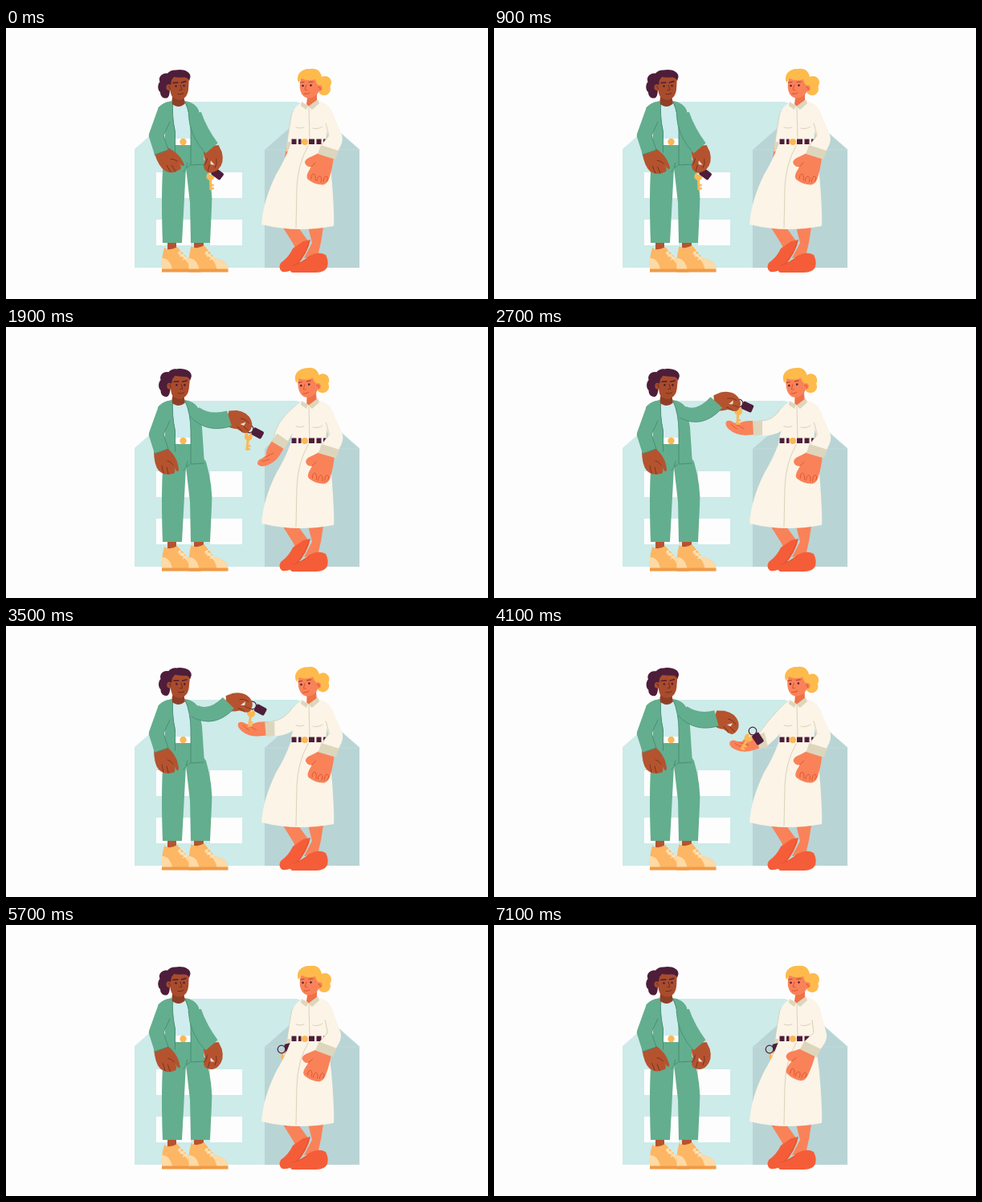
Recreate the animation shown at these times as an HTML page with a canvas. Size 600x338 px, loop 7.2 s.

```html
<!DOCTYPE html>
<html lang="en">
<head>
<meta charset="utf-8">
<title>Handing over the keys</title>
<style>
html, body { margin: 0; width: 100%; height: 100%; overflow: hidden; background: #fefdfe; }
canvas { display: block; }
</style>
</head>
<body>
<canvas id="stage" width="600" height="338"></canvas>
<script>
const ctx = document.getElementById('stage').getContext('2d');
const LOOP = 7200, STEP = 100;

const C = {
  paper: '#fefdfe', wall: '#cdebe9', gable: '#b9d4d5', seam: '#c4dbdb',
  green: '#63ae8e', greenLine: '#41876f', shirt: '#cfecee',
  brown: '#b5532f', face: '#a94c2c', neck: '#8f3f28', brownLine: '#6d2c1e', plum: '#4e1d39',
  gold: '#fbb755', shoe: '#fdb663', shoeCap: '#fddaa6', sole: '#f09a45',
  cream: '#fbf4e7', tan: '#ddd6bd', creamLine: '#d3c8ac',
  peach: '#f98259', peachLine: '#d9532f', blonde: '#feba4b', slipper: '#f55d38'
};

function fill(d, color) {
  ctx.fillStyle = color;
  ctx.fill(new Path2D(d));
}

function line(d, color, width = 0.9) {
  ctx.strokeStyle = color;
  ctx.lineWidth = width;
  ctx.stroke(new Path2D(d));
}

function dot(x, y, r, color) {
  ctx.fillStyle = color;
  ctx.beginPath();
  ctx.arc(x, y, r, 0, Math.PI * 2);
  ctx.fill();
}

function rect(x, y, w, h, color) {
  ctx.fillStyle = color;
  ctx.fillRect(x, y, w, h);
}

// Draws in a frame moved to (x, y) and turned by an angle in degrees.
function at(x, y, degrees, draw) {
  ctx.save();
  ctx.translate(x, y);
  ctx.rotate(degrees * Math.PI / 180);
  draw();
  ctx.restore();
}

function turned(x, y, degrees, draw) {
  at(x, y, degrees, () => { ctx.translate(-x, -y); draw(); });
}

// Smooth interpolation that rests on holds and never overshoots.
function track(t, keys) {
  const last = keys.length - 1;
  if (t <= keys[0][0]) return keys[0].slice(1);
  if (t >= keys[last][0]) return keys[last].slice(1);
  let i = 0;
  while (keys[i + 1][0] < t) i++;
  const slope = (k, c) => k < 0 || k >= last ? 0
    : (keys[k + 1][c] - keys[k][c]) / (keys[k + 1][0] - keys[k][0]);
  const tangent = (k, c) => {
    const a = slope(k - 1, c), b = slope(k, c);
    return a * b > 0 ? 2 * a * b / (a + b) : 0;
  };
  const span = keys[i + 1][0] - keys[i][0];
  const s = (t - keys[i][0]) / span, s2 = s * s, s3 = s2 * s;
  return keys[i].slice(1).map((v, n) => {
    const c = n + 1;
    return v * (2 * s3 - 3 * s2 + 1) + keys[i + 1][c] * (3 * s2 - 2 * s3)
      + span * (tangent(i, c) * (s3 - 2 * s2 + s) + tangent(i + 1, c) * (s3 - s2));
  });
}

// elbow x, elbow y, wrist x, wrist y, hand angle
const GIVING_ARM = [
  [1150, 239, 130, 256, 150, 83], [1400, 241, 130, 260, 147, 58],
  [1900, 252, 122, 278, 114, 16], [2500, 256, 117, 277, 94, -4],
  [3300, 256, 117, 277, 94, -4], [4100, 252, 122, 277, 115, 20],
  [4750, 239, 130, 256, 150, 83]
];
const TAKING_ARM = [
  [1450, 364, 128, 358, 148, 98], [1900, 344, 127, 342, 142, 124],
  [2500, 353, 129, 329, 126, 180], [3300, 353, 129, 329, 126, 180],
  [4100, 350, 126, 334, 143, 166], [4800, 364, 128, 358, 148, 98]
];
// ring x, ring y, fob angle, key angle
const KEYS = [
  [1150, 254, 175, 37, 88], [1400, 264, 172, 28, 88],
  [1900, 303, 127, 28, 97], [2500, 305, 95, 24, 95],
  [3300, 305, 95, 24, 95], [4100, 322, 131, 56, 122],
  [4500, 335, 148, 30, 105], [4800, 343, 155, -15, 65]
];
const IDLE_HAND = [[500, -18], [1350, 0], [5300, 0], [6100, -8]];
const FRONT_ARM = [[500, 0], [1900, -1], [5200, 0], [6400, 8]];
const GIVER_HEAD = [[1200, 0], [1900, 2.5], [3300, 2.5], [4700, 0]];
const TAKER_HEAD = [[1300, 0], [1900, -6], [3300, -6], [4500, 0]];

function sleeve(sx, sy, [ex, ey, wx, wy], widths, color, edge) {
  const normal = (ax, ay, bx, by) => {
    const len = Math.hypot(bx - ax, by - ay) || 1;
    return [-(by - ay) / len, (bx - ax) / len];
  };
  const n0 = normal(sx, sy, ex, ey), n1 = normal(sx, sy, wx, wy), n2 = normal(ex, ey, wx, wy);
  const p = (x, y, n, w) => `${x + n[0] * w} ${y + n[1] * w}`;
  const [a, b, c] = widths;
  const sideA = `${p(sx, sy, n0, a)} Q${p(ex, ey, n1, b)} ${p(wx, wy, n2, c)}`;
  const sideB = `L${p(wx, wy, n2, -c)} Q${p(ex, ey, n1, -b)} ${p(sx, sy, n0, -a)}`;
  fill(`M${sideA} ${sideB}Z`, color);
  line(`M${sideA}`, edge, 0.7);
}

function house() {
  fill('M160 299V151L227 92H362L381 99L440 151V299Z', C.wall);
  for (const y of [180, 239]) {
    rect(187, y, 43, 32, C.paper);
    rect(254, y, 40, 32, C.paper);
  }
  fill('M322 299V152L381 100L440 152V299Z', C.gable);
  line('M322 152H440', C.seam, 0.8);
}

function sneaker(x, lift) {
  at(x, 0, 0, () => {
    fill(`M3 ${275 - lift}Q10 ${280 - lift} 19 ${274 - lift}L32 287Q48 290 49 301H0Q-1 288 3 ${275 - lift}Z`, C.shoe);
    fill('M0 287Q10 287 13 301H0Z', C.shoeCap);
    fill('M21 278L32 287Q48 290 49 301H35Q33 289 21 283Z', C.shoeCap);
    rect(0, 300.5, 49, 4, C.sole);
    line('M20 281l5 -3M23 285l5 -3M26 289l5 -3', '#fff0d8', 1);
  });
}

function giverBody() {
  rect(201, 264, 11, 16, C.brown);
  rect(234, 264, 12, 14, C.brown);
  sneaker(194, 1);
  sneaker(227.5, 3);
  fill('M210 145H231L249 168Q258 200 256 224L254 268H230L229 218L224 174L219 268H195Q193 215 195 178L199 154Z', C.green);
  line('M226 168L224 174M229 171Q224 174 221 179', C.greenLine, 0.8);
  fill('M206 92Q214 100 224 92L231 102V146H206Z', C.shirt);
  rect(209, 138, 21, 8, '#ffffff');
  dot(220.5, 142, 4.2, C.gold);
  fill('M208 91C200 92 193 95 189 100L199 120L196 157L211 158V130Q206 108 208 91Z', C.green);
  fill('M222 91C231 92 237 96 240 103L244 125L247 171L230 172V130Q230 108 222 91Z', C.green);
  line('M208 92Q206 108 210.5 130V155M223 92Q230 108 230 130V171L246 170', C.greenLine, 0.8);
}

function giverHead(angle) {
  turned(214, 92, angle, () => {
    fill('M202 57C195 55 189 61 191.5 67C188 71 189 78 192 80C192 86 197 89 201 87C204 85 204 79 204 70Z', C.plum);
    fill('M208 80L206 94Q215 102 223 94L221 85Z', C.neck);
    fill('M204 60Q203 80 207 86Q213 91 219 89Q226 86 227 77L228 60Z', C.face);
    dot(203.5, 74, 4, C.face);
    fill('M199 69C197 59 202 52 211 52.5C220 50.5 230 54 229.5 61L228 66Q227 62 222 61.5Q214 62 209 61L206 65L205 71Z', C.plum);
    line('M208 68.5L214 68M218.5 68L224 66.5', C.plum, 1.4);
    dot(211.5, 72.5, 1.3, C.plum);
    dot(221.5, 72, 1.3, C.plum);
    line('M217 71L219 77L216 77.5M214 82.5Q218 83.5 221 81.5M202 73Q205 72 204 76', C.brownLine, 1);
  });
}

function giverIdleArm(angle) {
  turned(192, 153, angle, () => {
    fill('M184 153L200 150Q212 161 214 172Q216 180 214 180Q211 180 208 171Q213 183 207 183Q197 186 190 179Q184 172 184 153Z', C.brown);
    line('M208 172Q204 167 201 167M202 183L200 175M196 182L194 173', C.brownLine, 0.8);
  });
  fill('M207 91Q191 93 188 104L178 132Q177 135 179 139L185 158L202 152L196 134L204 117Z', C.green);
  line('M204 117L196 134L202 152L185 158', C.greenLine, 0.8);
}

function giverArm(pose) {
  at(pose[2], pose[3], pose[4], () => {
    fill('M-3 -9L6 -12Q20 -14 27 -5Q32 2 28 9Q25 14 20 12L13 10Q5 12 -3 9Z', C.brown);
    line('M27 8Q20 6 17 2M25 -1Q20 -5 14 -4M20 12Q17 8 12 7', C.brownLine, 0.8);
    fill('M15 3L21 -1L20 4Z', '#f2ded4');
  });
  sleeve(235, 106, pose, [8, 12, 10], C.green, C.greenLine);
}

function keyring([x, y, fob, key]) {
  at(x, y, key, () => {
    rect(10, -1.5, 17, 3, C.gold);
    rect(20, -4, 2.5, 4, C.gold);
    rect(24, -4, 2.5, 4, C.gold);
    dot(10, 0, 5, C.gold);
    dot(7, 0, 1.2, C.wall);
  });
  at(x, y, fob, () => {
    ctx.fillStyle = C.plum;
    ctx.beginPath();
    ctx.roundRect(4.5, -5, 14, 10, 2);
    ctx.fill();
  });
  ctx.beginPath();
  ctx.arc(x, y, 4.8, 0, Math.PI * 2);
  ctx.strokeStyle = C.plum;
  ctx.lineWidth = 1.2;
  ctx.stroke();
}

function takerArm(pose) {
  at(pose[2], pose[3], pose[4], () => {
    fill('M2 -8L16 -9Q28 -9 36 -2Q42 3 40 8Q36 11 31 7L25 5Q20 9 10 9L2 9Z', C.peach);
    line('M27 4Q22 2 18 -1M34 5Q31 1 27 -1', C.peachLine, 0.8);
  });
  sleeve(366, 106, pose, [10, 12, 9], C.cream, C.creamLine);
  at(pose[2], pose[3], pose[4], () => fill('M-5 -9L6 -9.5L7 9L-5 9Z', C.tan));
}

function takerBody() {
  fill('M376 248H395Q393 266 388 285L371 287L381 268Z', C.peach);
  fill('M345 249H364L377 267L364 284L358 270Z', C.peach);
  fill('M370 266L379 264Q376 280 361 298Q354 305 344 304Q338 300 342 293Q352 286 357 275Z', C.slipper);
  fill('M378 284Q389 278 398 283Q402 291 400 298Q397 305 386 305H356Q350 301 356 296Q368 293 378 284Z', C.slipper);
  line('M377 267Q373 282 362 294M378 285Q369 293 357 296', C.peachLine, 0.8);
  fill('M369 93L377 98L387 90Q396 93 402 102L400 117L398 146Q404 165 406 195Q409 237 408 247Q362 256 318 245Q320 216 336 183Q347 165 354 146L355 138L358 128L358 103Q361 96 369 93Z', C.cream);
  line('M377 100L378 138M376 147Q363 170 362 200L361 249M382 125Q388 127 394 123M361 124Q366 126 371 124', C.creamLine, 0.8);
  rect(355.5, 138.5, 43, 6.5, C.plum);
  for (const x of [361.5, 384, 392.5]) rect(x, 137.5, 2.5, 8.5, C.cream);
  rect(367.5, 138, 9.5, 8, C.cream);
  dot(372, 142, 4, C.gold);
}

function takerHead(angle) {
  turned(379, 93, angle, () => {
    dot(397, 68, 8, C.blonde);
    dot(396, 76, 8, C.blonde);
    fill('M376 80L374 95L378 99L387 93V78Z', '#ef7148');
    fill('M367 62Q364 75 368 82Q372 89 380 87Q389 85 391 74L390 61Z', C.peach);
    fill('M364 68C360 57 369 50 379 51C388 49.5 394 56 393 65L391 74Q386 70 385 64Q376 67 368 63Z', C.blonde);
    dot(390, 75, 3.8, C.peach);
    line('M366.5 68L371 67.5M377 67.5L382 67', '#b5482c', 1.2);
    dot(369.5, 72, 1.3, C.plum);
    dot(379.5, 71.5, 1.3, C.plum);
    line('M374 71L372 77L375 77.5M371 82Q375 83 378 81M389 74Q392 73 391 77', C.peachLine, 1);
  });
  fill('M368 92L376 97L374 102L367 97ZM376 98L388 89L390 94L381 102Z', C.tan);
}

function takerFrontArm(angle) {
  turned(398, 105, angle, () => {
    fill('M391 155L408 161Q406 176 403 185Q401 194 395 195.5Q385 196 376 189Q373 186 376 180L380 173Q374 174 372 168Q372 163 381 160Z', C.peach);
    line('M380 173L385 168M380 188Q380 182 383 182Q386 183 385 190M387 191Q388 184 391 185Q394 187 392 192M395 192Q396 184 399 185Q402 187 399 191', C.peachLine, 0.9);
    fill('M388 91Q401 93 406 104L418 133Q420 139 417 146L413 154L391 148L401 135L396 118Z', C.cream);
    line('M398 119L402 134L393 146', C.creamLine, 0.8);
    fill('M392 146L414 153L410 164L388 157Z', C.tan);
  });
}

function draw(t) {
  rect(0, 0, 600, 338, C.paper);
  house();
  giverBody();
  giverHead(track(t, GIVER_HEAD)[0]);
  giverIdleArm(track(t, IDLE_HAND)[0]);
  takerArm(track(t, TAKING_ARM));
  keyring(track(t, KEYS));
  takerBody();
  takerFrontArm(track(t, FRONT_ARM)[0]);
  takerHead(track(t, TAKER_HEAD)[0]);
  giverArm(track(t, GIVING_ARM));
}

ctx.lineCap = ctx.lineJoin = 'round';
const start = performance.now();

function tick() {
  const elapsed = Math.max(0, performance.now() - start) % LOOP;
  draw(Math.floor(elapsed / STEP) * STEP);
  requestAnimationFrame(tick);
}
tick();
</script>
</body>
</html>
```
